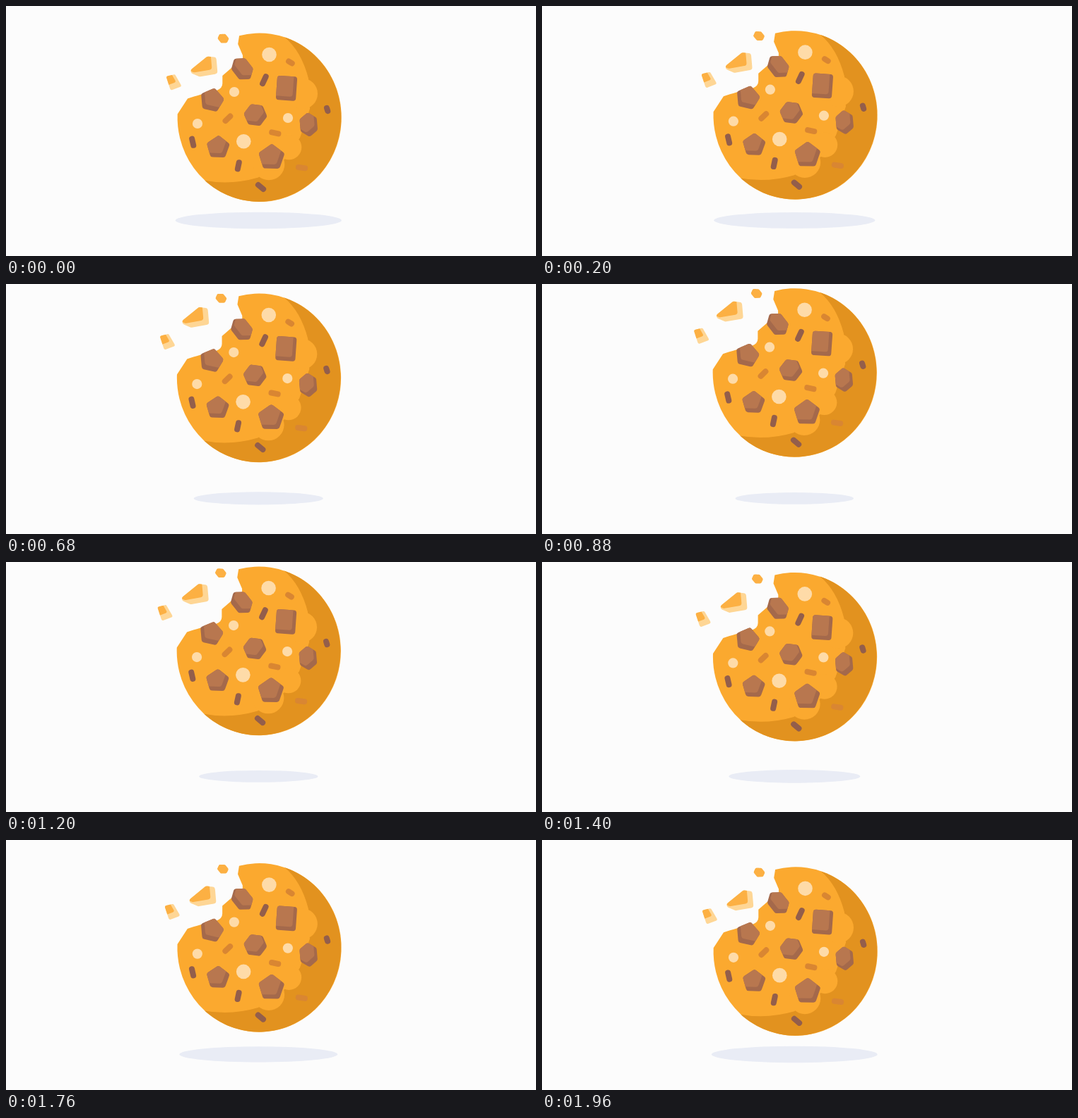
An HTML page with a canvas that plays this animation: 750 by 355 pixels, repeating every 2 s.

```html
<!DOCTYPE html>
<html lang="en">
<head>
<meta charset="utf-8">
<title>Floating cookie</title>
<style>
html, body { margin: 0; width: 100%; height: 100%; overflow: hidden; background: #fcfcfc; }
canvas { display: block; width: 750px; height: 355px; }
</style>
</head>
<body>
<canvas id="stage" width="750" height="355"></canvas>
<script>
const ctx = document.getElementById('stage').getContext('2d');
const LOOP = 2000, STEP = 40, RAD = Math.PI / 180;
const C = {
  bg: '#fcfcfc', shadow: '#e9ecf5', dough: '#fba92f', shade: '#e2921f',
  chip: '#b8774f', chipDark: '#a4694b', cream: '#fedba8',
  brown: '#935e4b', orange: '#d98632', crumb: '#fcb043', crumbLight: '#fed695'
};

// Smooth rise to the peak, then smooth return
function lift(t, peak) {
  const u = t < peak ? t / peak : (LOOP - t) / (LOOP - peak);
  return u * u * (3 - 2 * u);
}

// Corners of a regular polygon, stretched and then tilted
function polygon(x, y, rx, ry, tilt, sides) {
  const c = Math.cos(tilt * RAD), s = Math.sin(tilt * RAD);
  return Array.from({ length: sides }, (_, i) => {
    const a = (i + 0.5) * 2 * Math.PI / sides;
    const px = rx * Math.cos(a), py = ry * Math.sin(a);
    return [x + px * c - py * s, y + px * s + py * c];
  });
}

function blob(pts, r, color) {
  const mid = (p, q) => [(p[0] + q[0]) / 2, (p[1] + q[1]) / 2];
  ctx.beginPath();
  ctx.moveTo(...mid(pts[pts.length - 1], pts[0]));
  pts.forEach((p, i) => ctx.arcTo(...p, ...mid(p, pts[(i + 1) % pts.length]), r));
  ctx.closePath();
  ctx.fillStyle = color;
  ctx.fill();
}

function moved(x, y, paint) {
  ctx.save();
  ctx.translate(x, y);
  paint();
  ctx.restore();
}

// A rounded lump whose lit face is its own outline, shifted and clipped
function lump(pts, r, dark, lit, dx, dy) {
  ctx.save();
  blob(pts, r, dark);
  ctx.clip();
  moved(dx, dy, () => blob(pts, r, lit));
  ctx.restore();
}

function oval(x, y, rx, ry, color) {
  ctx.beginPath();
  ctx.ellipse(x, y, rx, ry, 0, 0, 7);
  ctx.fillStyle = color;
  ctx.fill();
}

const disc = (x, y, r, color) => oval(x, y, r, r, color);

function chunk(x, y, rx, ry, tilt, sides, side = -1) {
  lump(polygon(x, y, rx, ry, tilt, sides), 4, C.chipDark, C.chip, 4.5 * side, -6);
}

function sprinkle(color, x, y, angle, length = 9.4) {
  const dx = Math.cos(angle * RAD) * length / 2, dy = Math.sin(angle * RAD) * length / 2;
  ctx.strokeStyle = color;
  ctx.lineWidth = 8;
  ctx.lineCap = 'round';
  ctx.beginPath();
  ctx.moveTo(x - dx, y - dy);
  ctx.lineTo(x + dx, y + dy);
  ctx.stroke();
}

function dough() {
  const x = 358.7, y = 158.3, rx = 116.1, ry = 119.8;
  ctx.beginPath();
  ctx.ellipse(x, y, rx, ry, 0, -1.82, Math.PI + 0.04);
  ctx.lineTo(257, 131.5);
  ctx.quadraticCurveTo(264, 128.5, 298, 120);
  ctx.quadraticCurveTo(306.3, 117, 306.3, 110);
  ctx.lineTo(306.3, 99);
  ctx.lineTo(335, 74);
  ctx.lineTo(335, 70);
  ctx.lineTo(328.2, 54);
  ctx.closePath();
  ctx.fillStyle = C.dough;
  ctx.fill();

  ctx.save();
  ctx.beginPath();
  ctx.ellipse(x - 0.6, y - 0.2, rx, ry, 0, 0, 7);
  ctx.clip();
  ctx.beginPath();
  ctx.moveTo(394, 44);
  ctx.quadraticCurveTo(418, 64, 428, 103);
  ctx.lineTo(430, 146);
  ctx.lineTo(416, 187);
  ctx.lineTo(394, 218);
  ctx.lineTo(357, 243.5);
  ctx.quadraticCurveTo(318, 255, 278, 247.3);
  ctx.lineTo(278, 300);
  ctx.lineTo(490, 300);
  ctx.lineTo(490, 30);
  ctx.lineTo(394, 30);
  ctx.fillStyle = C.shade;
  ctx.fill();
  ctx.restore();

  disc(419, 124.5, 22, C.dough);
  disc(400.5, 200.5, 17.8, C.dough);
  disc(372, 225, 22.3, C.dough);
}

function cookie() {
  dough();
  disc(372.5, 69, 10.3, C.cream);
  disc(336.3, 192.3, 10.3, C.cream);
  disc(323, 122, 7.1, C.cream);
  disc(271, 167, 7.1, C.cream);
  disc(399, 159, 7.1, C.cream);

  sprinkle(C.orange, 402.4, 80, 32, 5.5);
  sprinkle(C.orange, 313.9, 159.8, 136);
  sprinkle(C.orange, 380.8, 180.4, 12);
  sprinkle(C.orange, 418.5, 229.6, 8);
  sprinkle(C.brown, 365.4, 105.2, 115, 11);
  sprinkle(C.brown, 264.2, 193.2, 77);
  sprinkle(C.brown, 328.8, 226.8, 102);
  sprinkle(C.brown, 360.5, 257, 40);
  sprinkle(C.brown, 454.6, 147, 73, 4.5);

  chunk(334.3, 89.3, 14.5, 18.5, -38, 6, 1);
  chunk(291.3, 133.8, 17.8, 17.8, 31, 5, 1);
  chunk(397, 116.8, 20, 24.3, 4, 4);
  chunk(353, 154.8, 16.8, 16.8, 37, 6);
  chunk(300.2, 200.8, 17.3, 17.3, 20, 5);
  chunk(375.8, 215, 19.5, 19.5, 19, 5);
  chunk(428.3, 168.5, 14, 17.5, -5, 6);
}

const crumbs = [
  { pts: polygon(307.5, 46.2, 8.5, 7, 25, 6), r: 2.5, dark: C.crumb, dx: -4, dy: -34, peak: 1000 },
  { pts: [[258, 93.5], [285, 71.5], [297.5, 73], [299.5, 96], [274, 100.5]], r: 4, dark: C.crumbLight, dx: -14.8, dy: -47.5, peak: 940 },
  { pts: [[226.5, 100], [239, 97], [248.8, 114], [233, 120]], r: 2.5, dark: C.crumbLight, dx: -13, dy: -38, peak: 1080 }
];

function draw(t) {
  ctx.fillStyle = C.bg;
  ctx.fillRect(0, 0, 750, 355);
  const k = lift(t, 1040), rx = 117.5 - 36 * k;
  oval(357.3, 304.4, rx, rx * 0.1, C.shadow);
  moved(-k, -34.5 * k, cookie);
  for (const { pts, r, dark, dx, dy, peak } of crumbs) {
    const s = lift(t, peak);
    moved(dx * s, dy * s, () => lump(pts, r, dark, C.crumb, -8, -6));
  }
}

const start = performance.now();
function tick() {
  const t = (performance.now() - start) % LOOP;
  draw(Math.floor(t / STEP) * STEP);
  requestAnimationFrame(tick);
}
tick();
</script>
</body>
</html>
```
